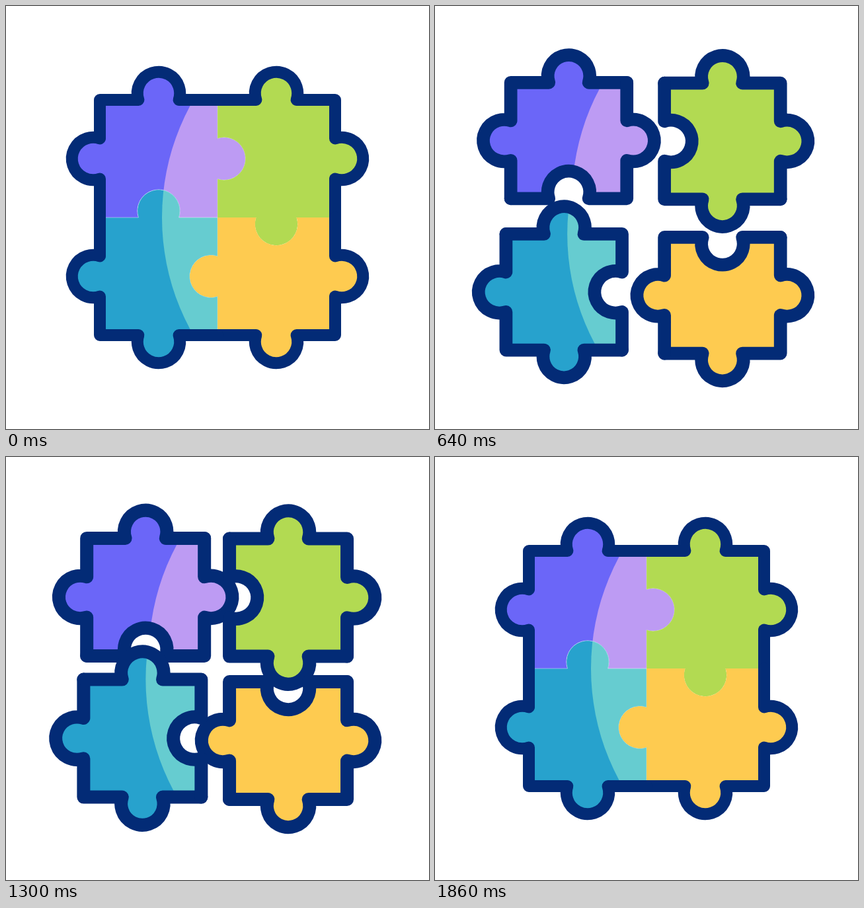
An HTML page with a canvas that plays this animation: 640 px wide and 640 px high, repeating every 2200 ms.

```html
<!DOCTYPE html>
<html lang="en">
<head>
<meta charset="utf-8">
<title>Puzzle</title>
<style>
  html, body { margin: 0; width: 100%; height: 100%; overflow: hidden; background: #fff; }
  canvas { display: block; width: 100vw; height: 100vh; }
</style>
</head>
<body>
<canvas id="stage" width="640" height="640"></canvas>
<script>
const ctx = document.getElementById('stage').getContext('2d');
const LOOP = 2200, NAVY = '#032b76';
const HALF = 89, KNOB = 32.2, SHIFT = 10;

// sides: top, right, bottom, left (1 = knob, -1 = socket); seam: first of the two inner sides
const pieces = [
  { home: [-HALF, -HALF], move: [-41.3, -39.7], sides: [1, 1, -1, 1], seam: 1, color: '#6b66f8', light: '#bd9bf3' },
  { home: [HALF, -HALF], move: [37.6, -38.4], sides: [1, 1, 1, -1], seam: 2, color: '#b2da52' },
  { home: [HALF, HALF], move: [37.6, 41.6], sides: [-1, 1, 1, 1], seam: 3, color: '#fecb50' },
  { home: [-HALF, HALF], move: [-51.3, 34.6], sides: [1, -1, 1, 1], seam: 0, color: '#27a2cd', light: '#66ccd0' }
];

function turn(x, y, q) {
  for (; q > 0; q--) [x, y] = [-y, x];
  return [x, y];
}

function outline(sides, first, count) {
  const path = new Path2D();
  const reach = Math.sqrt(KNOB * KNOB - SHIFT * SHIFT);
  path.moveTo(...turn(-HALF, -HALF, first % 4));
  for (let i = first; i < first + count; i++) {
    const q = i % 4, dir = sides[q], spin = q * Math.PI / 2;
    const center = turn(0, -HALF - SHIFT * dir, q);
    path.arc(...center, KNOB,
      Math.atan2(SHIFT * dir, -reach) + spin,
      Math.atan2(SHIFT * dir, reach) + spin, dir < 0);
    path.lineTo(...turn(HALF, -HALF, q));
  }
  return path;
}

for (const p of pieces) {
  p.body = outline(p.sides, 0, 4);
  p.body.closePath();
  p.inner = outline(p.sides, p.seam, 2);
  p.outer = outline(p.sides, p.seam + 2, 2);
}

const clamp = v => Math.min(1, Math.max(0, v));

function bezier(x1, y1, x2, y2) {
  const at = (a, b, s) => 3 * a * s * (1 - s) ** 2 + 3 * b * s * s * (1 - s) + s ** 3;
  return x => {
    if (x <= 0 || x >= 1) return clamp(x);
    let lo = 0, hi = 1;
    for (let i = 0; i < 30; i++) {
      const mid = (lo + hi) / 2;
      if (at(x1, x2, mid) < x) lo = mid; else hi = mid;
    }
    return at(y1, y2, lo);
  };
}

const squeeze = bezier(0.42, 0, 0.58, 1);
const burst = bezier(0.167, 0.167, 0, 1);
const span = (t, from, to) => clamp((t - from) / (to - from));

function pose(t) {
  const out = burst(span(t, 390, 1250));
  const back = burst(span(t, 1250, 1545));
  const dip = squeeze(span(t, 210, 390));
  return { scale: 1 - 0.05 * dip * (1 - out), spread: out * (1 - back) };
}

function draw(t) {
  const { scale, spread } = pose(t);
  const open = clamp((spread - 0.02) / 0.15);

  ctx.setTransform(1, 0, 0, 1, 0, 0);
  ctx.fillStyle = '#fff';
  ctx.fillRect(0, 0, 640, 640);
  ctx.lineJoin = ctx.lineCap = 'round';

  const each = paint => pieces.forEach(p => {
    const [x, y] = p.home.map((h, i) => h + p.move[i] * spread);
    ctx.setTransform(scale, 0, 0, scale, 320 + x * scale, 320 + y * scale);
    paint(p);
  });

  each(p => {
    ctx.fillStyle = p.color;
    ctx.fill(p.body);
    if (!p.light) return;
    ctx.save();
    ctx.clip(p.body);
    ctx.beginPath();
    ctx.arc(593 - 320 - p.home[0], -p.home[1], 357, 0, 2 * Math.PI);
    ctx.fillStyle = p.light;
    ctx.fill();
    ctx.restore();
  });

  // pale hairline where closed pieces meet
  if (open === 0) each(p => {
    if (!p.light) return;
    ctx.strokeStyle = 'rgba(255,255,255,0.22)';
    ctx.lineWidth = 1;
    ctx.stroke(p.inner);
  });

  each(p => {
    ctx.strokeStyle = NAVY;
    ctx.lineWidth = 18 + 2 * open;
    ctx.stroke(p.outer);
    if (open > 0) {
      ctx.lineWidth = 20 * open;
      ctx.stroke(p.inner);
    }
  });
}

const start = performance.now();
function tick() {
  const t = (performance.now() - start) % LOOP;
  draw(Math.floor(t / 20) * 20);
  requestAnimationFrame(tick);
}
tick();
</script>
</body>
</html>
```
